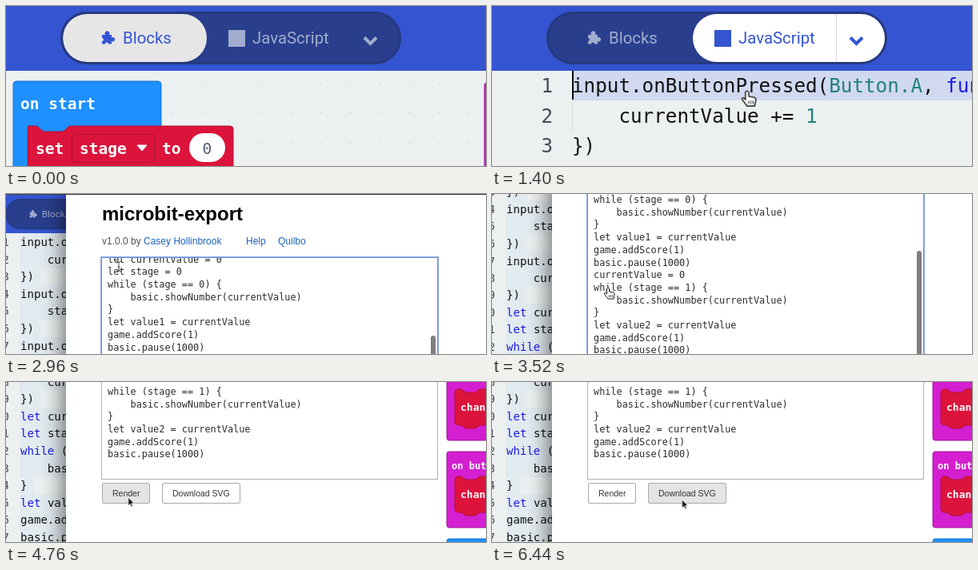
An HTML page for the animation above (6520 ms loop, 600 by 200 pixels).

```html
<!DOCTYPE html>
<html lang="en">
<head>
<meta charset="utf-8">
<title>Exporting blocks</title>
<style>
:root { --loop: 6.52s; --blue: #3454d1; --dim: rgba(255,255,255,.57); --mono: "DejaVu Sans Mono", monospace; }
html, body { margin: 0; width: 100%; height: 100%; overflow: hidden; }
#stage { position: relative; width: 600px; height: 200px; overflow: hidden; background: #ecf0f1; }
#stage div, #stage svg, .abs { position: absolute; }
pre { margin: 0; font-family: var(--mono); }

/* every animation shares the loop; hard changes use step-end */
.move { animation: var(--loop) ease-in-out infinite; }
.cut { animation: var(--loop) step-end infinite; }

/* the dark backdrop shows as a hairline above header and page */
#camera { inset: 0; background: #444; animation-name: pan; }
@keyframes pan { 0%, 49.08% { transform: none; } 58.9%, 100% { transform: translateY(-211px); } }

#editor { left: 0; top: 0; width: 1100px; height: 1100px; background: #ecf0f1; transform-origin: 0 0; animation-name: zoom; }
@keyframes zoom { 0%, 34.36% { transform: none; } 44.17%, 100% { transform: translate(-40px, 2px) scale(.58); } }

/* header with the mode switch */
#header { left: 0; top: -2px; width: 1100px; height: 83px; background: var(--blue); }
#switch { left: 68px; top: 7px; width: 420px; height: 60px; border: 3px solid #26397f; border-radius: 33px; background: #293f8d; overflow: hidden; }
#pill { left: 0; top: 0; width: 180px; height: 60px; animation-name: slide; }
@keyframes slide { 0%, 13.5% { transform: none; } 18.4%, 100% { transform: translateX(180px); } }
#pill div { inset: 0; animation-name: face; }
@keyframes face {
  0% { background: #e6e6e6; border-radius: 30px; }
  13.5%, 100% { background: #fff; border-radius: 30px 0 0 30px; }
}
#drop { left: 359px; top: 0; width: 61px; height: 60px; background: #fff; box-sizing: border-box; border-left: 1px solid #d5d9e4; animation-name: late; }
.tab { left: 0; top: 0; width: 600px; height: 80px; font: 20.4px Roboto, sans-serif; }
.tab svg { left: 0; top: 0; }
.tab span { position: absolute; top: 28px; line-height: 24px; }
#blocksTab { animation-name: lose; }
#scriptTab { animation-name: gain; }
@keyframes lose { 0% { color: var(--blue); } 13.5%, 100% { color: var(--dim); } }
@keyframes gain { 0% { color: var(--dim); } 13.5%, 100% { color: var(--blue); } }

/* block workspace, then code */
#workspace { left: 0; top: 81px; width: 600px; height: 119px; overflow: hidden; animation-name: early;
  background: radial-gradient(circle, #dfe4e6 1px, transparent 1.5px) 5px 34px / 37px 37px #ecf0f1; }
#workspace svg { left: 0; top: -81px; }
svg text { font-family: var(--mono); font-weight: 700; fill: #fff; white-space: pre; }
@keyframes early { 0% { visibility: visible; } 13.5%, 100% { visibility: hidden; } }
@keyframes late { 0% { visibility: hidden; } 13.5%, 100% { visibility: visible; } }

#code { left: 0; top: 81.4px; width: 1100px; animation-name: late; }
#line { left: 100px; top: 0; width: 1000px; height: 37px; background: #d1d9f0; animation-name: typing; }
#line i { position: absolute; left: 0; top: 0; width: 2px; height: 36px; background: #000; }
@keyframes typing { 0% { visibility: hidden; } 13.5% { visibility: visible; } 26.99%, 100% { visibility: hidden; } }
#code pre { font-size: 24.25px; line-height: 37.2px; }
#numbers { left: 0; width: 76px; text-align: right; color: #464b55; }
#lines { left: 100px; color: #111; }
#stage .row { position: relative; height: 37.2px; width: max-content; padding-right: 1ch; border-radius: 3px; animation-name: select; }
.row.in { box-shadow: inset 1px 0 #d3d8da; }
@keyframes select { 0% { background: transparent; } 26.99% { background: #add6ff; } 44.17%, 100% { background: #e2ebf0; } }
#match { left: 100px; top: 75px; width: 14px; height: 35px; box-sizing: border-box; border: 1px solid #a5b5b8; background: rgba(120,140,120,.25); animation-name: match; }
@keyframes match { 0% { visibility: hidden; } 26.99% { visibility: visible; } 34.36%, 100% { visibility: hidden; } }
.k { color: #1c1ce0; }
.t { color: #21807f; }

/* export page */
#page { left: 75px; top: 1px; width: 560px; height: 520px; background: #fff; box-shadow: -4px 0 25px rgba(0,0,0,.55);
  font: 12px "Liberation Sans", Arial, sans-serif; color: #555; animation-name: enter; }
@keyframes enter { 0%, 34.36% { transform: translateX(620px); } 44.17%, 100% { transform: none; } }
#inner { left: -75px; top: -1px; width: 640px; height: 500px; }
h1 { position: absolute; margin: 0; left: 120px; top: 11px; font-size: 24px; line-height: 28px; color: #000; }
.meta { left: 120px; top: 51px; line-height: 16px; white-space: nowrap; }
.link { color: #1c62b9; }
#box { left: 119px; top: 79px; width: 419px; height: 252px; border: 1px solid; overflow: hidden; animation-name: focus; }
@keyframes focus {
  0% { border-color: #6d92dc; box-shadow: 0 0 0 1px #8fabe2; }
  61.35%, 100% { border-color: #b0b0b0; box-shadow: none; }
}
#box pre { position: absolute; left: 7px; top: -5.4px; font-size: 11.87px; line-height: 15.7px; color: #2c2c2c; }
#thumb { right: 2px; top: 97px; width: 6px; height: 152px; border-radius: 3px; background: #7e7e7e; animation-name: fade; }
@keyframes fade { 0%, 67% { opacity: 1; } 71%, 100% { opacity: 0; } }
.buttons { left: 120px; top: 337px; display: flex; gap: 14.5px; }
.buttons span { padding: 0 12px; border: 1px solid #a9a9a9; border-radius: 2px; background: #fff; color: #333; font-size: 10.5px; line-height: 24px; white-space: nowrap; }
#idle { animation-name: idle; }
#busy { animation-name: busy; }
#busy span:first-child { background: #e2e5e4; }
@keyframes idle { 0% { visibility: visible; } 61.35% { visibility: hidden; } 71.17%, 100% { visibility: visible; } }
@keyframes busy { 0% { visibility: hidden; } 61.35% { visibility: visible; } 71.17%, 100% { visibility: hidden; } }
#idle span:first-child { animation-name: hoverA; }
#idle span:last-child { animation-name: hoverB; }
@keyframes hoverA { 0% { background: #fff; } 57% { background: #e2e5e4; } 74.5%, 100% { background: #fff; } }
@keyframes hoverB { 0% { background: #fff; } 76%, 100% { background: #e2e5e4; } }
#result { left: 550px; top: 188px; animation-name: result; }
@keyframes result { 0% { visibility: hidden; } 71.78%, 100% { visibility: visible; } }

/* download token flying to the toolbar */
#token { left: 241px; top: 75px; width: 64px; height: 64px; border-radius: 50%; background: #a8a8a8; animation: token var(--loop) step-end infinite, fly var(--loop) ease-in infinite; }
@keyframes token { 0% { visibility: hidden; } 84.6% { visibility: visible; } 94.4%, 100% { visibility: hidden; } }
@keyframes fly { 0%, 84.66% { transform: none; } 94.4%, 100% { transform: translate(150px, -190px) scale(.6); } }

/* one pointer path, three shapes; the origin is the hot spot */
#pointer { left: 0; top: 0; animation-name: path; }
@keyframes path {
  0%, 1.84% { transform: translate(440px, 230px) scale(1.35); }
  10.43%, 19.02% { transform: translate(300px, 49px) scale(1.35); }
  23.31%, 34.36% { transform: translate(330px, 140px) scale(1.35); }
  40%, 49.08% { transform: translate(141px, 90px); }
  58.9%, 71.78% { transform: translate(149px, 144px); }
  80.37%, 100% { transform: translate(237.5px, 147px); }
}
#pointer svg { left: 0; top: 0; overflow: visible; }
#arrow { animation-name: arrow; }
#hand { animation-name: hand; }
#beam { animation-name: beam; }
@keyframes arrow { 0% { visibility: hidden; } 1.84% { visibility: visible; } 9.5% { visibility: hidden; } 71.78%, 100% { visibility: visible; } }
@keyframes hand { 0% { visibility: hidden; } 9.5% { visibility: visible; } 22% { visibility: hidden; } 54% { visibility: visible; } 71.78%, 100% { visibility: hidden; } }
@keyframes beam { 0% { visibility: hidden; } 22% { visibility: visible; } 26.38% { visibility: hidden; } 40% { visibility: visible; } 54%, 100% { visibility: hidden; } }
</style>
</head>
<body>
<div id="stage">
  <div id="camera" class="move">
    <div id="editor" class="move">
      <div id="workspace" class="cut">
        <svg width="600" height="200" font-size="19.5">
          <path d="M9 210V98q0-4 4-4H190q4 0 4 4V158H27V210z" fill="#1e90ff" stroke="#1873cc"/>
          <path d="M27.5 210V150H37c5 0 6 7 12 7H69c6 0 7-7 12-7H280q4 0 4 4V210z" fill="#dc143c" stroke="#b01030"/>
          <rect x="82.5" y="160.5" width="103" height="35" rx="4" fill="none" stroke="#b01030"/>
          <path d="M164 174h12l-6 7z" fill="#fff" stroke="#fff" stroke-linejoin="round"/>
          <rect x="229" y="159" width="45" height="36" rx="18" fill="#fff"/>
          <text x="18" y="128.5">on start</text>
          <text x="37" y="184.5">set</text>
          <text x="92" y="184.5">stage</text>
          <text x="195" y="184.5">to</text>
          <text x="245.5" y="184.5" style="fill:#575e75;font-weight:400">0</text>
          <rect x="598" y="96" width="20" height="120" rx="3" fill="#d41fd0" stroke="#9c1a99"/>
        </svg>
      </div>
      <div id="code" class="cut">
        <div id="line" class="cut"><i></i></div>
        <pre id="numbers" class="abs"></pre>
        <pre id="lines" class="abs"></pre>
        <div id="match" class="cut"></div>
      </div>
      <div id="header"></div>
      <div id="switch">
        <div id="pill" class="move"><div class="cut"></div></div>
        <div id="drop" class="cut"></div>
      </div>
      <div id="blocksTab" class="tab cut">
        <svg width="600" height="80" fill="currentColor"><path d="M120 36h4a3 3 0 1 1 5 0h3v3.5a2.7 2.7 0 1 1 0 4.5V47.5h-4a2 2 0 1 0-4 0h-4V44a2 2 0 1 0 0-4z"/></svg>
        <span style="left:146px">Blocks</span>
      </div>
      <div id="scriptTab" class="tab cut">
        <svg width="600" height="80"><rect x="278" y="30" width="21" height="21" fill="currentColor"/><path d="M448 39.5l7.5 7.5 7.5-7.5" fill="none" stroke="currentColor" stroke-width="4"/></svg>
        <span style="left:308px">JavaScript</span>
      </div>
    </div>
    <div id="page" class="move">
      <div id="inner">
        <h1>microbit-export</h1>
        <div class="meta">v1.0.0 by <span class="link">Casey Hollinbrook</span></div>
        <div class="meta link" style="left:300px">Help</div>
        <div class="meta link" style="left:340px">Quilbo</div>
        <div id="box" class="cut"><pre id="pasted"></pre><div id="thumb" class="move"></div></div>
        <div id="idle" class="buttons cut"><span class="cut">Render</span><span class="cut">Download SVG</span></div>
        <div id="busy" class="buttons cut"><span>Rendering...</span><span>Download SVG</span></div>
        <svg id="result" class="cut" width="90" height="300" font-size="12">
          <defs>
            <g id="handler">
              <rect width="120" height="95" rx="3" fill="#d41fd0" stroke="#9c1a99"/>
              <path d="M10 36q0-5 5-5h2c3 0 4 4 8 4h9c4 0 5-4 8-4h70v45H42c-3 0-4 4-8 4h-9c-4 0-5-4-8-4h-2q-5 0-5-5z" fill="#dc143c" stroke="#b01030"/>
              <text x="6" y="22">on button</text>
              <text x="17" y="58" font-size="13">change</text>
            </g>
          </defs>
          <use href="#handler" x="1" y="1"/>
          <use href="#handler" x="1" y="110"/>
          <rect x="1" y="219" width="120" height="90" rx="3" fill="#1e90ff" stroke="#1873cc"/>
        </svg>
      </div>
    </div>
  </div>
  <div id="token"></div>
  <div id="pointer" class="move">
    <svg id="arrow" class="cut" width="1" height="1"><path d="M0 0V10.5L2.4 8.4 4 12 5.8 11.2 4.2 7.7H7.5z" fill="#111" stroke="#fff" stroke-width=".8"/></svg>
    <svg id="hand" class="cut" width="1" height="1"><path d="M-1.5 1q1.5-2 3 0V5l5 1q2 .5 1.5 3L7 14H0L-4.5 8q-.5-2 1.5-1.5L-1.5 8z" fill="#fff" stroke="#111" stroke-linejoin="round"/><path d="M1.5 9v3M3.5 9v3M5.5 9v3" stroke="#111" stroke-width=".7"/></svg>
    <svg id="beam" class="cut" width="1" height="1"><path d="M-3-6q3 0 3 2 0-2 3-2M0-4V5M-3 7q3 0 3-2 0 2 3 2M-1.5 1h3" fill="none" stroke="#444"/></svg>
  </div>
</div>
<script>
const handler = (button, body) =>
  [`input.onButtonPressed(Button.${button}, function () {`, `    ${body}`, '})'];
const round = (n) =>
  [`while (stage == ${n}) {`, '    basic.showNumber(currentValue)', '}',
   `let value${n + 1} = currentValue`, 'game.addScore(1)', 'basic.pause(1000)'];

const setup = [...handler('A', 'currentValue += 1'), ...handler('B', 'stage += 1'), ...handler('AB', 'currentValue = 0')];
const main = ['let currentValue = 0', 'let stage = 0', ...round(0), 'currentValue = 0', ...round(1)];
const source = [...setup, ...main];

const paint = (text) => text
  .replace(/\b(let|while|function)\b|\bButton\.\w+|\b\d+\b/g,
    (word, key) => `<span class="${key ? 'k' : 't'}">${word}</span>`);

const byId = (id) => document.getElementById(id);
byId('numbers').textContent = source.map((_, i) => i + 1).join('\n');
byId('lines').innerHTML = source
  .map((text) => `<div class="row cut${text[0] === ' ' ? ' in' : ''}">${paint(text)}</div>`)
  .join('');
byId('pasted').textContent = main.join('\n');
</script>
</body>
</html>
```
